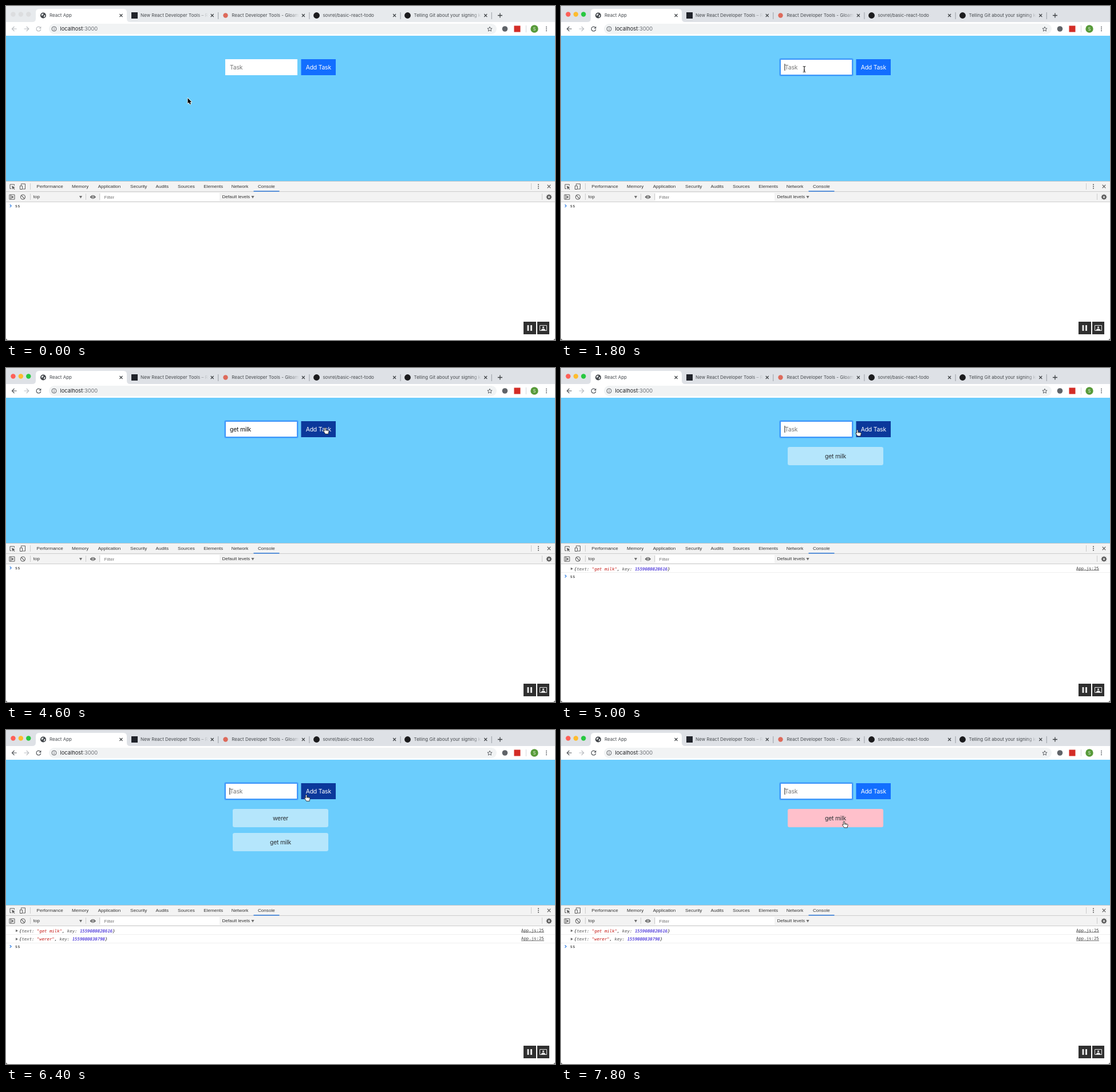
An HTML page with a canvas that plays this animation: 959 px wide and 584 px high, repeating every 8 s.

```html
<!DOCTYPE html>
<html lang="en">
<head>
<meta charset="utf-8">
<title>Todo app</title>
<style>
  html, body { margin: 0; width: 100%; height: 100%; overflow: hidden; background: #fff; }
  canvas { display: block; }
</style>
</head>
<body>
<canvas id="stage" width="959" height="584"></canvas>
<script>
const ctx = document.getElementById('stage').getContext('2d');
const LOOP = 8000, STEP = 200;
const UI = 'Inter, sans-serif';
const ARIAL = '"Liberation Sans", Arial, sans-serif';
const MONO = '7.33px "DejaVu Sans Mono", monospace';
const GREY = '#5f6368', DEV = '#5a5a5a';

// Moments of the story, in ms
const CLICK = 1400, TYPE_1 = 2400, TYPED_1 = 3800, ADD_1 = 4800;
const TYPE_2 = 5400, TYPED_2 = 5800, ADD_2 = 6400, REMOVE = 7600;

const INPUT = { x: 383, y: 93, w: 126, h: 28 };
const BUTTON = { x: 515.5, y: 93, w: 60.5, h: 28 };
const itemBox = i => ({ x: 396, y: 138 + 42 * i, w: 167, h: 32 });

// Pointer path: time, x, y
const TRACK = [
  [0, 317.5, 161], [400, 317.5, 161], [1200, 425, 110.5], [3800, 425, 110.5],
  [4400, 557.5, 104.5], [4800, 557.5, 104.5], [5200, 478, 112], [5800, 478, 112],
  [6200, 524.5, 113.5], [6600, 524.5, 113.5], [7200, 494.5, 160], [LOOP, 494.5, 160]
];

const HAND = new Path2D('M-1.2 .9 Q-1.2 -.3 0 -.3 Q1.1 -.3 1.1 .9 V4 L2.6 3.8 L4.4 4.3 L6 4.9 ' +
  'Q6.7 5.3 6.6 6.4 L5.8 9 V10.8 H.2 L-1.2 8.6 L-2.9 6.2 Q-3.2 5 -2 5 L-1.2 5.8 Z');
const ARROW = new Path2D('M0 0 V9.4 L2.1 7.5 L3.7 11 L5.4 10.2 L3.9 6.9 H6.7 Z');

function rect(x, y, w, h, color) {
  ctx.fillStyle = color;
  ctx.fillRect(x, y, w, h);
}

function round(x, y, w, h, r, color) {
  ctx.fillStyle = color;
  ctx.beginPath();
  ctx.roundRect(x, y, w, h, r);
  ctx.fill();
}

function disc(x, y, r, color) {
  ctx.fillStyle = color;
  ctx.beginPath();
  ctx.arc(x, y, r, 0, 7);
  ctx.fill();
}

function stroke(d, color, width = 1, x = 0, y = 0) {
  ctx.save();
  ctx.translate(x, y);
  ctx.strokeStyle = color;
  ctx.lineWidth = width;
  ctx.stroke(new Path2D(d));
  ctx.restore();
}

function fill(d, color, x = 0, y = 0) {
  ctx.save();
  ctx.translate(x, y);
  ctx.fillStyle = color;
  ctx.fill(new Path2D(d));
  ctx.restore();
}

// Draws text on its baseline and returns its width
function text(s, x, y, font, color, spacing = 0, align = 'left') {
  ctx.font = font;
  ctx.letterSpacing = spacing + 'px';
  ctx.textAlign = align;
  ctx.fillStyle = color;
  ctx.fillText(s, x, y);
  return ctx.measureText(s).width;
}

const cross = (x, y, r, color, width = 1.1) =>
  stroke(`M${-r} ${-r}L${r} ${r}M${r} ${-r}L${-r} ${r}`, color, width, x, y);
const kebab = (x, y, gap, color) => [-gap, 0, gap].forEach(d => disc(x, y + d, 1, color));
const caretDown = (x, y) => fill('M-2.6 -2H2.6L0 2.4Z', '#6e6e6e', x, y);
const pageText = (s, x, y, color, align) => text(s, x, y, '10.4px ' + UI, color, -0.2, align);

function tabTitle(s, x) {
  const fade = ctx.createLinearGradient(x + 100, 0, x + 118, 0);
  fade.addColorStop(0, '#45494d');
  fade.addColorStop(1, 'rgba(69,73,77,0)');
  text(s, x, 19.2, '8px ' + UI, fade);
}

function drawTabs(active) {
  rect(0, 0, 959, 28, active ? '#dee1e6' : '#e7eaed');
  const lights = active ? ['#ff5f57', '#febc2e', '#28c840'] : Array(3).fill('#dcdddf');
  lights.forEach((c, i) => disc(12.5 + 13.4 * i, 14.5, 4.2, c));

  fill('M46 28Q52 28 52 22V11Q52 5 58 5H205Q211 5 211 11V22Q211 28 217 28Z', '#fff');
  disc(65, 16.5, 5, '#414549');
  fill('M-3.5 -1.5L-1 -3.5L1 -2.5L-1 -.5L-2 1.5ZM1 0L3.5 -1L3 2L1 3.5Z', '#e8eaec', 65, 16.5);
  round(219, 11, 11, 11, 0, '#20232a');
  disc(383.5, 16.5, 4.2, '#dd6a5b');
  disc(542.5, 16.5, 5.4, '#1b1b1d');
  disc(701.5, 16.5, 5.4, '#1b1b1d');

  ['React App', 'New React Developer Tools – React', 'React Developer Tools - Gloam Web',
    'sovrel/basic-react-todo', 'Telling Git about your signing key'].forEach((s, i) => {
    tabTitle(s, i ? 235 + 159.2 * (i - 1) : 76);
    cross(201 + 159.2 * i, 16.5, 2.5, '#3c4043');
    if (i) rect(211 + 159.2 * i, 11, 1, 12, '#9a9ea5');
  });
  stroke('M-4 0H4M0 -4V4', '#3c4043', 1.3, 863, 16.5);
}

function drawToolbar(active) {
  const nav = active ? '#54585d' : '#babdc1';
  const left = 'M4.2 0H-4M0 -4L-4 0L0 4';
  rect(0, 28, 959, 24, '#fff');
  stroke(left, nav, 1.2, 14.5, 40);
  stroke('M-4.2 0H4M0 -4L4 0L0 4', '#babdc1', 1.2, 35.8, 40);
  stroke('M3 -2.4A3.9 3.9 0 1 0 3.8 1', nav, 1.2, 57, 40);
  fill('M4.4 -4.4V-.6H.6Z', nav, 57, 40);

  round(75, 31, 782, 18, 9, '#f1f3f4');
  stroke('M4 0A4 4 0 1 1 -4 0A4 4 0 1 1 4 0M0 -.6V2.3M0 -2.3V-1.3', GREY, 1, 84, 40);
  const w = text('localhost', 94.5, 43.3, '9.3px ' + UI, '#202124');
  text(':3000', 94.5 + w, 43.3, '9.3px ' + UI, '#6b6f74');

  stroke('M0 -4L1.2 -1.3L4.1 -1.1L1.9 .8L2.6 3.7L0 2.1L-2.6 3.7L-1.9 .8L-4.1 -1.1L-1.2 -1.3Z',
    GREY, 1, 845, 40.3);
  disc(871.5, 40, 4.8, GREY);
  rect(887.5, 34.5, 11, 11, '#d32d27');
  rect(908, 34, 1, 12, '#d5d7da');
  disc(923, 40, 6.7, '#579a39');
  text('S', 923, 42.6, '7px ' + UI, '#fff', 0, 'center');
  kebab(944, 40, 3.2, GREY);
}

function drawDevtools() {
  rect(0, 306, 959, 37, '#f3f3f3');
  rect(0, 306, 959, 1, '#c4c8ca');
  rect(0, 324, 959, 1, '#ccc');
  rect(0, 342, 959, 1, '#ccc');
  rect(0, 343, 959, 241, '#fff');

  stroke('M14.5 314V312H7V319.5H9.5', DEV);
  fill('M10 314.5L15.8 317L13.4 318L15.5 320.3L14.6 321L12.6 318.8L11.5 321Z', DEV);
  stroke('M26.5 313.5V311H33.5V320H29.5M24.5 314.5H28.5V320.5H24.5Z', DEV);
  rect(42, 310, 1, 11, '#ccc');
  const tabs = { Performance: 53.5, Memory: 115, Application: 160.7, Security: 217, Audits: 261.5,
    Sources: 300, Elements: 345.3, Network: 393.7, Console: 440 };
  for (const name in tabs) text(name, tabs[name], 318.3, '8.1px ' + ARIAL, '#333');
  rect(432.5, 323, 45, 1.6, '#3b82dc');
  rect(917, 310, 1, 11, '#ccc');
  kebab(930, 315.5, 3.3, DEV);
  cross(948.5, 315.5, 2.8, DEV, 1.2);

  stroke('M6 330H15V338H6ZM8.5 330V338', DEV);
  fill('M10 331.8L13.8 334L10 336.2Z', DEV);
  stroke('M4 0A4 4 0 1 1 -4 0A4 4 0 1 1 4 0M-2.8 -2.8L2.8 2.8', DEV, 1.1, 29.5, 334);
  [42, 139, 163, 936].forEach(x => rect(x, 328, 1, 11, '#ccc'));
  text('top', 47.8, 336.4, '8.1px ' + ARIAL, '#333');
  caretDown(130.5, 334);
  fill('M-5.2 0Q0 -6.6 5.2 0Q0 6.6 -5.2 0Z', DEV, 151.8, 334);
  disc(151.8, 334, 2.2, '#f3f3f3');
  disc(151.8, 334, 1.3, DEV);
  rect(165, 327, 208, 14, '#fff');
  text('Filter', 171.5, 337, '8px ' + ARIAL, '#757575');
  text('Default levels', 377.5, 336.4, '8.1px ' + ARIAL, '#333');
  caretDown(431, 334);
  for (let i = 0; i < 4; i++) {
    const a = i * Math.PI / 4, c = 4.8 * Math.cos(a), s = 4.8 * Math.sin(a);
    stroke(`M${-c} ${-s}L${c} ${s}`, DEV, 1.9, 948.5, 334);
  }
  disc(948.5, 334, 3.6, DEV);
  disc(948.5, 334, 1.6, '#f3f3f3');
}

function drawLogs(logs) {
  logs.forEach(([task, key], i) => {
    const y = 353.6 + 14.6 * i;
    fill('M0 -2.3L4 0L0 2.3Z', '#6e6e6e', 17, y - 2.6);
    let x = 23;
    [['{', '#222'], ['text: ', '#565656'], [`"${task}"`, '#c41a16'], [', ', '#222'],
      ['key: ', '#565656'], [key, '#1c00cf'], ['}', '#222']].forEach(([s, c]) => {
      x += text(s, x, y, 'italic ' + MONO, c);
    });
    text('App.js:25', 900, y - 1.1, MONO, '#444');
    rect(900, y - 0.2, 40, 0.8, '#555');
    rect(0, 357 + 15 * i, 959, 1, '#f0f0f0');
  });
  const y = 352.1 + 14.5 * logs.length;
  stroke('M0 -2.3L2.4 0L0 2.3', '#2f7de1', 1.2, 6.8, y - 2.5);
  text('ss', 15.8, y, MONO, '#222');
}

function drawRecorder() {
  rect(904, 552, 22, 22, '#303030');
  rect(928, 552, 21, 22, '#303030');
  rect(910.5, 558, 3, 10, '#e6e6e6');
  rect(916, 558, 3, 10, '#e6e6e6');
  stroke('M932.5 558.5H944.5V567.5H932.5Z', '#e6e6e6');
  disc(938.5, 561.8, 1.6, '#e6e6e6');
  fill('M934.5 567Q935.5 564 938.5 564Q941.5 564 942.5 567Z', '#e6e6e6');
}

const inside = (p, b) => p.x >= b.x && p.x <= b.x + b.w && p.y >= b.y && p.y <= b.y + b.h;

function pointerAt(t) {
  const i = TRACK.findIndex(k => k[0] > t);
  const [t0, x0, y0] = TRACK[i - 1], [t1, x1, y1] = TRACK[i];
  const u = (t - t0) / (t1 - t0), e = u * u * (3 - 2 * u);
  return { x: x0 + (x1 - x0) * e, y: y0 + (y1 - y0) * e };
}

function typedAt(t) {
  if (t >= TYPE_1 && t < ADD_1) return 'get milk'.slice(0, (t - TYPE_1) / 200 + 1);
  if (t >= TYPE_2 && t < ADD_2) return 'werer'.slice(0, (t - TYPE_2) / 100 + 2);
  return '';
}

function caretOn(t) {
  if (t < CLICK) return false;
  if ((t >= TYPE_1 && t <= TYPED_1) || (t >= TYPE_2 && t <= TYPED_2)) return true;
  const last = [CLICK, TYPED_1, ADD_1, TYPED_2, ADD_2].filter(m => m <= t).pop();
  return (t - last) % 1000 < 500;
}

function drawPointer(p, over, isInput) {
  ctx.save();
  ctx.translate(p.x, p.y);
  ctx.lineJoin = 'round';
  if (isInput) {
    const beam = 'M-2.3 -5Q0 -5 0 -3.8Q0 -5 2.3 -5M0 -4V4M-2.3 5Q0 5 0 3.8Q0 5 2.3 5M-1.2 1.8H1.2';
    stroke(beam, '#fff', 2.2);
    stroke(beam, '#111', 1.1);
  } else if (over) {
    ctx.fillStyle = '#fff';
    ctx.fill(HAND);
    ctx.strokeStyle = '#222';
    ctx.lineWidth = 0.9;
    ctx.stroke(HAND);
    stroke('M1.1 4V5.6M2.8 4V5.7M4.5 4.4V5.9', '#222', 0.7);
  } else {
    ctx.strokeStyle = '#fff';
    ctx.lineWidth = 1.6;
    ctx.stroke(ARROW);
    ctx.fillStyle = '#000';
    ctx.fill(ARROW);
  }
  ctx.restore();
}

function drawPage(t) {
  const p = pointerAt(t);
  const overButton = inside(p, BUTTON);
  const items = [];
  if (t >= ADD_2 && t < REMOVE) items.push('werer');
  if (t >= ADD_1) items.push('get milk');

  rect(0, 52, 959, 254, '#6bcdfd');
  if (t >= CLICK) {
    round(381, 91, 130, 32, 3, 'rgba(60,150,250,.4)');
    round(382, 92, 128, 30, 2, '#3f97fa');
    rect(384, 94, 124, 26, '#fff');
  } else {
    rect(INPUT.x, INPUT.y, INPUT.w, INPUT.h, '#fff');
  }
  const typed = typedAt(t);
  const w = pageText(typed || 'Task', 391, 110.7, typed ? '#111' : '#757575');
  if (caretOn(t)) rect(391 + (typed ? w : -0.5), 101, 0.9, 12, '#000');

  rect(BUTTON.x, BUTTON.y, BUTTON.w, BUTTON.h, overButton ? '#0b389b' : '#126eff');
  pageText('Add Task', 523.7, 110.7, '#fff');

  let overItem = false;
  items.forEach((s, i) => {
    const b = itemBox(i), hover = inside(p, b);
    overItem = overItem || hover;
    round(b.x, b.y, b.w, b.h, 3.3, hover ? '#ffc0cb' : '#b5e6fc');
    pageText(s, 479.5, b.y + 19.5, '#2b2f33', 'center');
  });

  const hidden = (t >= TYPE_1 && t <= TYPED_1) || (t >= TYPE_2 && t <= TYPED_2);
  if (!hidden) drawPointer(p, overButton || overItem, inside(p, INPUT));
}

function draw(t) {
  const active = t >= CLICK;
  drawTabs(active);
  drawToolbar(active);
  drawDevtools();
  drawLogs([['get milk', '1559080828616', ADD_1], ['werer', '1559080830798', ADD_2]]
    .filter(log => t >= log[2]));
  drawRecorder();
  drawPage(t);
  fill('M0 580Q0 584 4 584H0ZM959 580Q959 584 955 584H959Z', '#4a4a4a');
}

const start = performance.now();
function tick() {
  const t = (performance.now() - start) % LOOP;
  draw(Math.floor(t / STEP) * STEP);
  requestAnimationFrame(tick);
}
tick();
</script>
</body>
</html>
```
